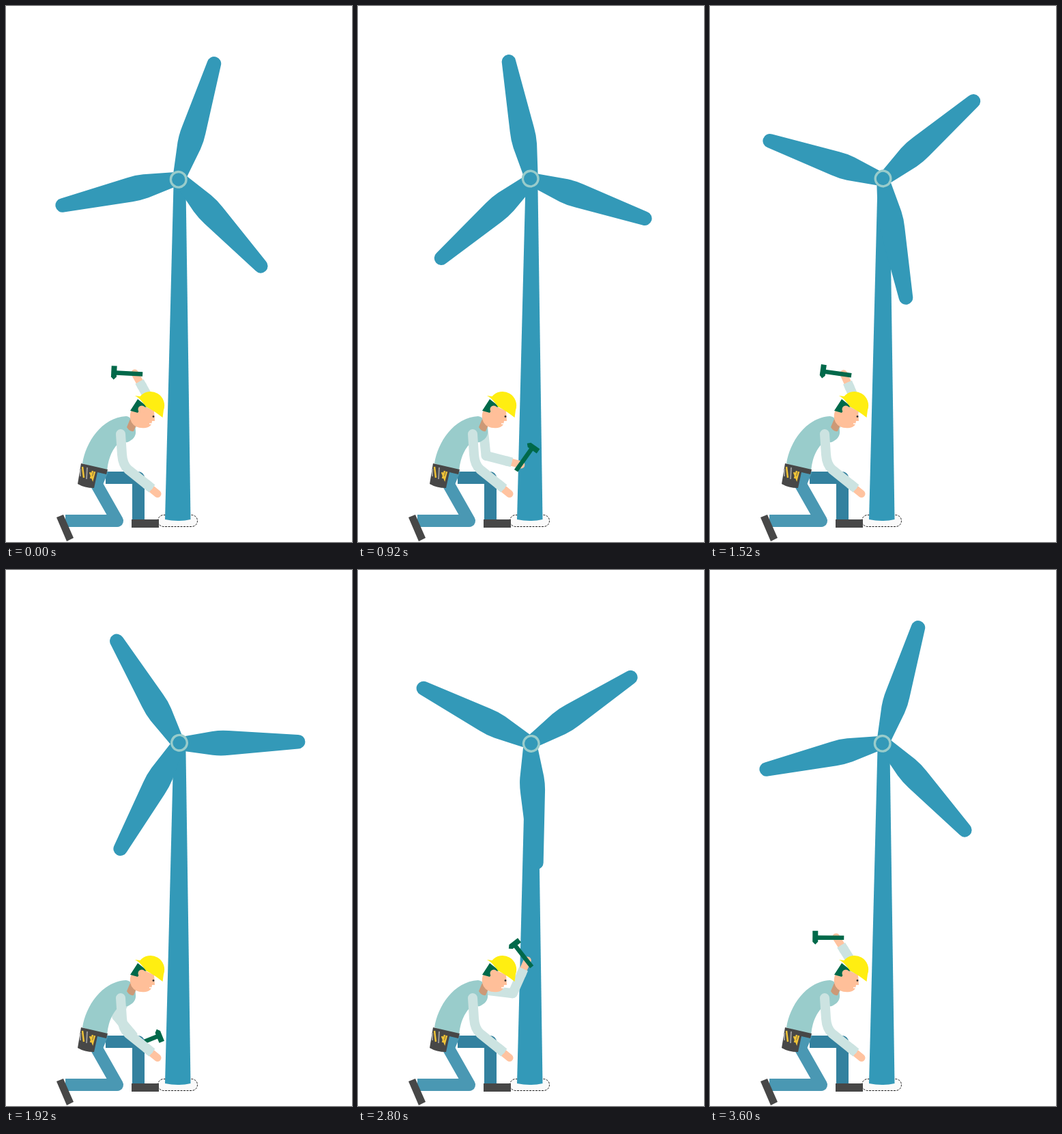
These frames come from a looping animation (507x784 px, 3.64 s). An HTML page:

```html
<!DOCTYPE html>
<html lang="en">
<head>
<meta charset="utf-8">
<title>Wind turbine worker</title>
<style>
  html, body { margin: 0; width: 100%; height: 100%; overflow: hidden; background: #fff; }
  svg { display: block; width: 507px; height: 784px; }
  .blue { fill: #3399b8; }
  .skin { fill: #ffbf99; }
  .jeans { fill: none; stroke-width: 18; stroke-linejoin: round; }
  .near { stroke: #33819f; }
  .far { stroke: #4a98b3; }
  .sleeve { fill: none; stroke: #cce3e1; stroke-width: 14; stroke-linecap: round; stroke-linejoin: round; }
  .cuff { stroke-linecap: butt; }
  .hand { fill: none; stroke: #ffc3a0; stroke-width: 11; stroke-linecap: round; }
  .dark { fill: #474747; }
  .green { fill: #00694a; }
  .vest { fill: #99cccb; }
</style>
</head>
<body>
<svg viewBox="0 0 507 784">
  <defs>
    <path id="blade" d="M-9.5 0L-17.5 -50Q-19 -62 -17.9 -74L-10.3 -175.4A10.3 10.3 0 0 1 10.3 -175.4L17.9 -74Q19 -62 17.5 -50L9.5 0Z"/>
  </defs>

  <rect x="222.5" y="744.5" width="58" height="17" rx="8.5" fill="#fafafa" stroke="#222" stroke-dasharray="3 1.5"/>
  <path class="blue" d="M245.7 254H263.3L270.5 751Q252 755 233 751Z"/>

  <g id="rotor" class="blue">
    <g transform="rotate(17) translate(0 -1.2)">
      <use href="#blade"/>
      <use href="#blade" transform="rotate(120)"/>
      <use href="#blade" transform="rotate(240)"/>
    </g>
    <circle cx="-.6" cy=".6" r="11.3" stroke="#99cccb" stroke-width="3.4"/>
  </g>

  <g id="upper">
    <path class="sleeve" d="M0 0H44"/>
    <g id="fore">
      <path class="hand" d="M36 0H53"/>
      <path class="sleeve" d="M0 0H32"/>
      <path class="sleeve cuff" d="M30 0H39"/>
      <g id="hammer" class="green">
        <path d="M-11 -3.2H28V3.2H-11Z"/>
        <path d="M27 10H35V-6L31 -10L27 -6Z"/>
      </g>
    </g>
  </g>

  <path class="jeans near" d="M146 690H194V752"/>
  <path class="jeans far" d="M126 688L163 753H87"/>
  <path fill="#4a98b3" d="M130 676L150 681L142 700L120 698Z"/>
  <path class="dark" d="M184 751H224V763H184ZM74 748L84 744L99 778L89 783Z"/>

  <path class="vest" d="M112 669C117 638 140 602 176 600C185 601 191 613 190 625C189 632 183 636 178 638L164 640C153 652 149 667 148 682Z"/>
  <path fill="#cc9977" d="M182 604L191 613L187 622Q181 623 177 616Z"/>

  <path class="dark" d="M110 669L149 678L147 685L134 682L129 705Q115 705 105 699Z"/>
  <path d="M112 674L114 690M130 681L127 692L123 682M127 680L124 691" fill="none" stroke="#f0c337" stroke-width="2.5"/>
  <path d="M119 675L118 692M109 677V688" fill="none" stroke="#999" stroke-width="2"/>

  <path class="skin" d="M183 593L198 584L217 592L218 607L214 607Q214 615 205 617Q190 619 184 609Q180 601 183 593Z"/>
  <path class="green" d="M182 592L193 575L207 586L198 588L193 595Z"/>
  <circle class="skin" cx="199" cy="590" r="5.5"/>
  <circle cx="216" cy="600.5" r="1.4" fill="#333"/>
  <path d="M210 611H214" stroke="#fff" stroke-width="1.5"/>
  <path fill="#ffee11" d="M189 570L196.5 571A20.3 20.3 0 0 1 231 591L229.5 602Q217 592 205 586Q197 574 189 570Z"/>

  <path class="hand" d="M214 707L222 713.5"/>
  <path class="sleeve" d="M168 626L170 656Q171 671 179 678L209 702"/>
  <path class="sleeve cuff" d="M205 698.7L214 706"/>
</svg>
<script>
  const LOOP = 3640, STEP = 40, SWING = 1200, SWAY = 0.025;
  const el = id => document.getElementById(id);
  const rotor = el('rotor'), upper = el('upper'), fore = el('fore'), hammer = el('hammer');
  const place = (node, x, y, angle) =>
    node.setAttribute('transform', `translate(${x} ${y}) rotate(${angle})`);

  // Cosine ease from a to b while t runs from t0 to t1.
  function ease(t, t0, t1, a, b) {
    const k = Math.min(1, Math.max(0, (t - t0) / (t1 - t0)));
    return a + (b - a) * (1 - Math.cos(Math.PI * k)) / 2;
  }

  // 0 is the raised hammer, 1 the finished blow.
  function swing(t) {
    if (t < 320) return SWAY * (2 * Math.sqrt(t / 320) - 1);
    return t < 760 ? ease(t, 320, 540, SWAY, 1) : ease(t, 800, SWING, 1, -SWAY);
  }

  function draw(t) {
    place(rotor, 253.3, 253.2, t / 10);
    // The swing opens one step in.
    const s = swing(Math.max(t, STEP) % SWING);
    place(upper, 183, 614, -43 + 161 * s);
    place(fore, 44, 0, -75 + 7 * s);
    place(hammer, 52, 0, 302 - 14 * s);
  }

  const start = performance.now();
  function tick() {
    const t = (performance.now() - start) % LOOP;
    draw(Math.floor(t / STEP) * STEP);
    requestAnimationFrame(tick);
  }
  tick();
</script>
</body>
</html>
```
